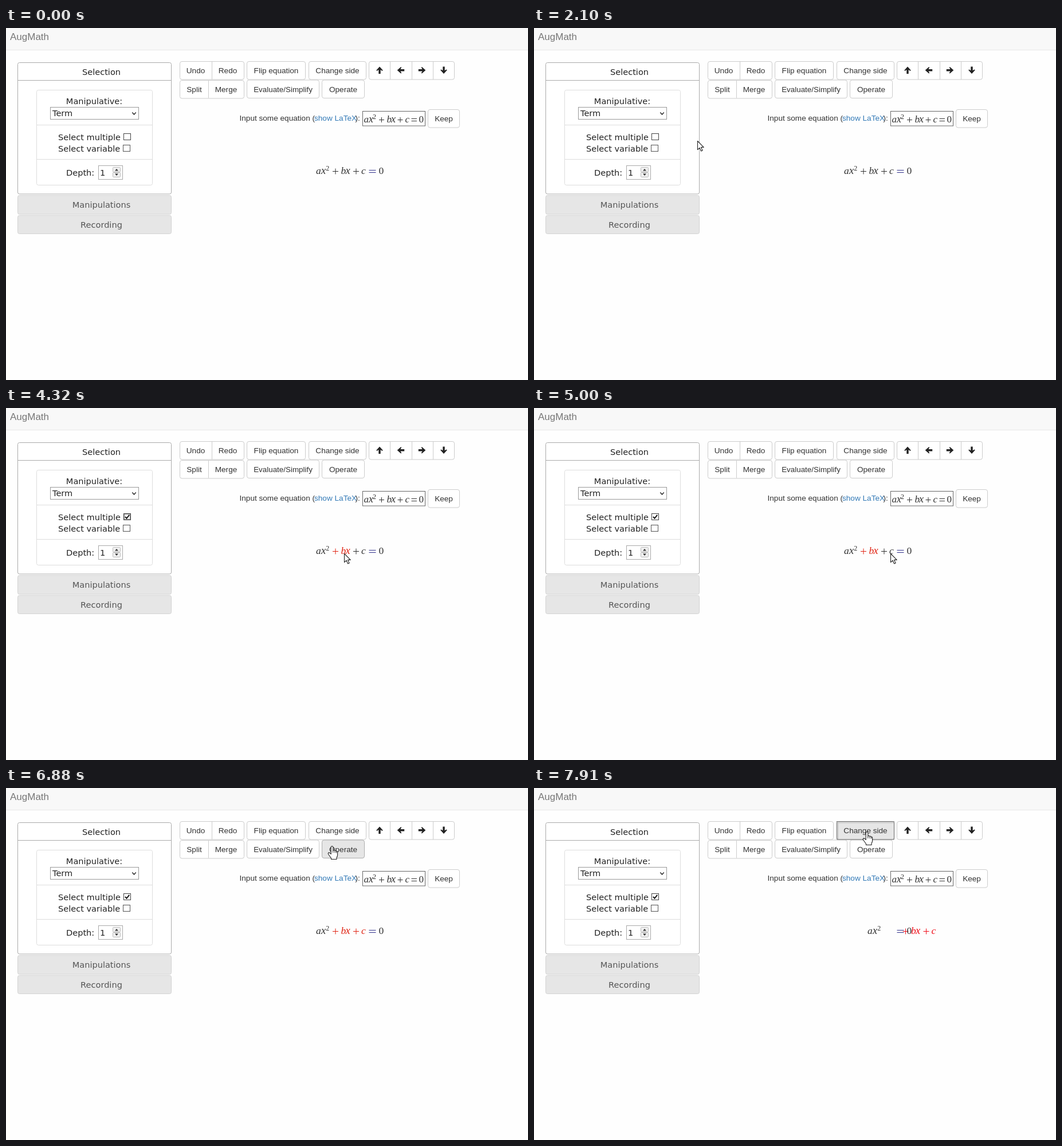
These frames come from a looping animation (911 px wide and 615 px high, 8000 ms). An HTML page:

```html
<!DOCTYPE html>
<html lang="en">
<head>
<meta charset="utf-8">
<title>Equation editor</title>
<style>
  html, body { margin: 0; width: 100%; height: 100%; overflow: hidden; background: #fefefe; }
  svg { display: block; width: 911px; height: 615px; }
  .ui { font: 13.6px "Liberation Sans", Arial, sans-serif; fill: #333; }
  .panel { font: 14.55px "DejaVu Sans", Verdana, sans-serif; fill: #222; }
  .math { font: 17px "Liberation Serif", "Times New Roman", serif; fill: #333; stroke: none; }
  .math path { fill: none; stroke: #333; stroke-width: 1; }
  .math .equals path { stroke: #34348c; stroke-width: 1.2; }
  .math .picked { fill: #e02414; }
  .math .picked path { stroke: #e02414; }
  .math .moving { fill: #f0101c; }
  .math .moving path { stroke: #f0101c; }
</style>
</head>
<body>
<svg id="stage" viewBox="0 0 911 615" xmlns="http://www.w3.org/2000/svg"></svg>
<script>
const LOOP = 8000;
const stage = document.getElementById('stage');

function add(parent, tag, attrs = {}, content) {
  const node = document.createElementNS('http://www.w3.org/2000/svg', tag);
  for (const key in attrs) node.setAttribute(key, attrs[key]);
  if (content !== undefined) node.textContent = content;
  parent.appendChild(node);
  return node;
}
const group = (parent, cls = '') => add(parent, 'g', { class: cls });
const text = (parent, x, y, str, attrs) => add(parent, 'text', { x, y, ...attrs }, str);
const centred = (parent, x, y, str, attrs) => text(parent, x, y, str, { 'text-anchor': 'middle', ...attrs });
const path = (parent, d, attrs) => add(parent, 'path', { d, fill: 'none', ...attrs });
const box = (parent, x, y, width, height, stroke, fill = '#fff', rx = 0) =>
  add(parent, 'rect', { x: x + .5, y: y + .5, width, height, stroke, fill, rx });
const show = (node, on) => node.setAttribute('visibility', on ? 'visible' : 'hidden');

// Header
const ui = group(stage, 'ui');
add(ui, 'rect', { width: 911, height: 38, fill: '#f8f8f8' });
path(ui, 'M0 38.5H911', { stroke: '#e7e7e7' });
text(ui, 7, 21, 'AugMath', { 'font-size': 17, fill: '#777' });

// Side panel
const panel = group(stage, 'panel');
box(panel, 20, 60, 268, 229.5, '#aaa', '#fff', 3);
path(panel, 'M20.5 91.5H288.5', { stroke: '#aaa' });
centred(panel, 166.5, 82, 'Selection');
box(panel, 53, 108, 202, 166, '#ddd', '#fff', 3);
path(panel, 'M53.5 169.5H255.5M53.5 229.5H255.5', { stroke: '#ddd' });
centred(panel, 154, 133, 'Manipulative:');
box(panel, 77, 138, 154, 21, '#999');
text(panel, 81, 154, 'Term');
path(panel, 'M220.3 147.5l3.2 3.5 3.2-3.5', { stroke: '#333', 'stroke-width': 1.6 });
text(panel, 91, 196, 'Select multiple');
text(panel, 91, 216, 'Select variable');
const multiple = box(panel, 205, 184, 12, 11, '#444');
box(panel, 204, 204, 12, 11, '#555');
const tick = path(panel, 'M208 190l2.5 2.8 4.7-6', { stroke: '#111', 'stroke-width': 2 });
const tickFocus = path(panel, 'M206.5 185.5h10v9h-10z', { stroke: '#222', 'stroke-dasharray': '1 1' });
text(panel, 105, 258, 'Depth:');
box(panel, 161, 240, 42, 24, '#aaa');
text(panel, 164, 258, '1');
box(panel, 186, 243, 13, 8, '#bbb', '#f0f0f0', 1);
box(panel, 186, 252, 13, 8, '#bbb', '#f0f0f0', 1);
path(panel, 'M190 249.5l3-3.5 3 3.5zM190 254.5l3 3.5 3-3.5z', { fill: '#333' });
[['Manipulations', 292, 33], ['Recording', 327, 32]].forEach(([label, y, h]) => {
  box(panel, 20, y, 268, h, '#d3d3d3', '#e6e6e6', 3);
  centred(panel, 166.5, y + 22, label, { fill: '#555' });
});

// Toolbar
function button(x, y, w, label, size = 13.6) {
  const rect = box(ui, x, y, w, 31.5, '#ccc', '#fff', 3.5);
  if (label) centred(ui, x + w / 2 + .5, y + 21, label, { 'font-size': size });
  return rect;
}
button(303, 58, 112);
button(303, 91, 112);
path(ui, 'M359.5 58.5v31.5M353.5 91.5v31', { stroke: '#ccc' });
centred(ui, 331, 79, 'Undo');
centred(ui, 387, 79, 'Redo');
centred(ui, 328.5, 111.5, 'Split');
centred(ui, 384, 111.5, 'Merge');
button(420, 58, 102, 'Flip equation');
const changeSide = button(528, 58, 100, 'Change side');
button(420, 90.5, 126, 'Evaluate/Simplify', 13.4);
const operate = button(551, 90.5, 74, 'Operate');
const sideShade = path(ui, 'M530 60.5h97M530.5 61v28', { stroke: '#000', 'stroke-opacity': .12, 'stroke-width': 2 });
const sideFocus = path(ui, 'M528.5 58.5h100v31.5h-100z', { stroke: '#222', 'stroke-dasharray': '1 1' });
button(633, 58, 149);
path(ui, 'M670.5 58.5v31.5M708.5 58.5v31.5M745.5 58.5v31.5', { stroke: '#ccc' });
[[652, 0], [689, -90], [726, 90], [764, 180]].forEach(([x, turn]) =>
  path(ui, 'M0-6.3L5.8.2 4.6 1.2 1.7-.6V6.2H-1.7V-.6L-4.6 1.2-5.8.2z',
    { fill: '#222', transform: `translate(${x} 73.7) rotate(${turn})` }));

// Equation input
text(ui, 407.5, 162, 'Input some equation (');
text(ui, 538, 162, 'show LaTeX', { fill: '#337ab7' });
text(ui, 609.5, 162, '):');
box(ui, 622, 145, 109, 25.5, '#666');
button(736, 142, 55, 'Keep');

const italic = { 'font-style': 'italic' };
const letter = (g, x, y, ch, size = 17) => text(g, x, y, ch, { ...italic, 'font-size': size });
const plus = (g, x, y, r) => path(g, `M${x - r} ${y}h${2 * r}M${x} ${y - r}v${2 * r}`);
const equals = (g, x, y, w) => path(g, `M${x} ${y - 2}h${w}M${x} ${y + 2}h${w}`);

const field = group(stage, 'math');
letter(field, 624.5, 165, 'a');
letter(field, 633, 165, 'x', 18);
text(field, 640, 158.5, '2', { 'font-size': 12 });
plus(field, 655.5, 160.5, 4.5);
letter(field, 664.5, 165, 'b');
letter(field, 672, 165, 'x', 18);
plus(field, 688, 160.5, 4.5);
letter(field, 696.5, 165, 'c');
equals(field, 707.5, 160.5, 9.5);
text(field, 720.5, 165, '0');

// Main equation
const math = group(stage, 'math');
const square = group(math);
letter(square, 541, 255, 'a', 17.5);
letter(square, 550, 255, 'x', 18.5);
text(square, 558.3, 248.5, '2', { 'font-size': 12 });
const bx = group(math);
plus(bx, 575, 250.5, 5);
letter(bx, 584.5, 255, 'b', 17.5);
letter(bx, 592.5, 255, 'x', 18.5);
const c = group(math);
plus(c, 611, 250.5, 5);
letter(c, 620, 255, 'c', 17.5);
const equalSign = group(math, 'equals');
equals(equalSign, 633.5, 250.5, 12);
text(math, 650.5, 255, '0', { 'font-size': 17.5 });

// Pointers
const outline = { fill: '#fff', stroke: '#222', 'stroke-width': 1.1, 'stroke-linejoin': 'round' };
const arrow = path(stage, 'M.5.5V15.6L4 12.3 6.6 18 9.1 16.9 6.6 11.4H11.2z', outline);
const hand = group(stage);
path(hand, 'M-1.8 12.5V1.6Q-1.8-.4 0-.4T1.8 1.6V7Q3.6 5.6 5 7.6 6.8 6.6 7.6 8.6 9.6 8 9.6 10.4V15Q9.6 17.5 8 19.5V22.5H-1.5V20.5L-6.4 13.8Q-7.4 11.4-5.4 10.9-3.8 10.8-1.8 13.5z', outline);
path(hand, 'M1.8 7v4M5 7.8v3.4M7.6 9v2.6', { stroke: '#222' });

// The screen refreshes in bursts: [start, end, number of refreshes].
const bursts = [
  [370, 1160, 9], [1250, 2020, 11], [2100, 2480, 6], [2690, 2690, 1], [2830, 2960, 2],
  [3100, 3410, 5], [3570, 4030, 7], [4320, 4610, 5], [4790, 5000, 4], [5470, 5470, 1],
  [5620, 5780, 3], [6170, 6950, 11], [7020, 7310, 5], [7480, 7730, 4], [7910, 7910, 1]
];
function lastRefresh(t) {
  let last = 0;
  for (const [start, end, count] of bursts) {
    if (t < start) break;
    const gap = (end - start) / (count - 1) || 1;
    last = start + Math.min(count - 1, Math.floor((t - start) / gap + 1e-6)) * gap;
  }
  return last;
}

// Pointer route: [time, x, y]
const route = [
  [370, 825, 600], [770, 715, 425], [1160, 635, 295], [1250, 632, 291], [1481, 607, 262],
  [2020, 303, 199], [2100, 285, 197], [2480, 209, 185], [2690, 210, 186], [2960, 210, 186],
  [3100, 235, 190], [3410, 616, 239], [3650, 618, 252], [3800, 604, 260], [4030, 590, 254],
  [4320, 590, 254], [4610, 618, 253], [5000, 622, 254], [5470, 623, 254], [5780, 624, 251],
  [6170, 623, 247], [6600, 592, 150], [6870, 569, 102], [6950, 569, 101],
  [7310, 581, 77], [8000, 581, 77]
];
function pointerAt(t) {
  const i = Math.max(1, route.findIndex(key => key[0] >= t));
  const [t0, x0, y0] = route[i - 1], [t1, x1, y1] = route[i];
  const k = Math.max(0, (t - t0) / (t1 - t0));
  return [x0 + (x1 - x0) * k, y0 + (y1 - y0) * k];
}

function paint(rect, fill, stroke) {
  rect.setAttribute('fill', fill);
  rect.setAttribute('stroke', stroke);
}
const slide = (node, dx) => node.setAttribute('transform', `translate(${dx} 0)`);

function render(time) {
  const t = lastRefresh(time);
  const [x, y] = pointerAt(t);
  const overOperate = y > 90 && y < 123 && x > 551 && x < 626;
  const overSide = y < 90 && x > 528 && x < 628;
  const overButton = overOperate || overSide;
  const place = `translate(${Math.round(x)} ${Math.round(y)})`;
  arrow.setAttribute('transform', place);
  hand.setAttribute('transform', place);
  show(arrow, t >= 370 && !overButton);
  show(hand, t >= 370 && overButton);

  const pressed = t >= 2830 && t < 2960;
  const hovered = t >= 2690 && t < 3100;
  paint(multiple, pressed ? '#cce4f7' : '#fff', hovered ? '#2878b8' : '#444');
  show(tick, t >= 2960);
  show(tickFocus, t >= 2830 && t < 4790);

  paint(operate, overOperate ? '#e6e6e6' : '#fff', overOperate ? '#adadad' : '#ccc');
  paint(changeSide, overSide ? '#e6e6e6' : '#fff', overSide ? '#adadad' : '#ccc');
  show(sideShade, t >= 7480);
  show(sideFocus, t >= 7480);

  const shift = Math.min(1, Math.max(0, (t - 7610) / 300));
  const red = shift > 0 ? 'moving' : 'picked';
  bx.setAttribute('class', t >= 4320 ? red : '');
  c.setAttribute('class', t >= 6170 ? red : '');
  slide(square, 41 * shift);
  slide(bx, 73.5 * shift);
  slide(c, 73.5 * shift);
}

const began = performance.now();
function frame() {
  render((performance.now() - began) % LOOP);
  requestAnimationFrame(frame);
}
frame();
</script>
</body>
</html>
```
